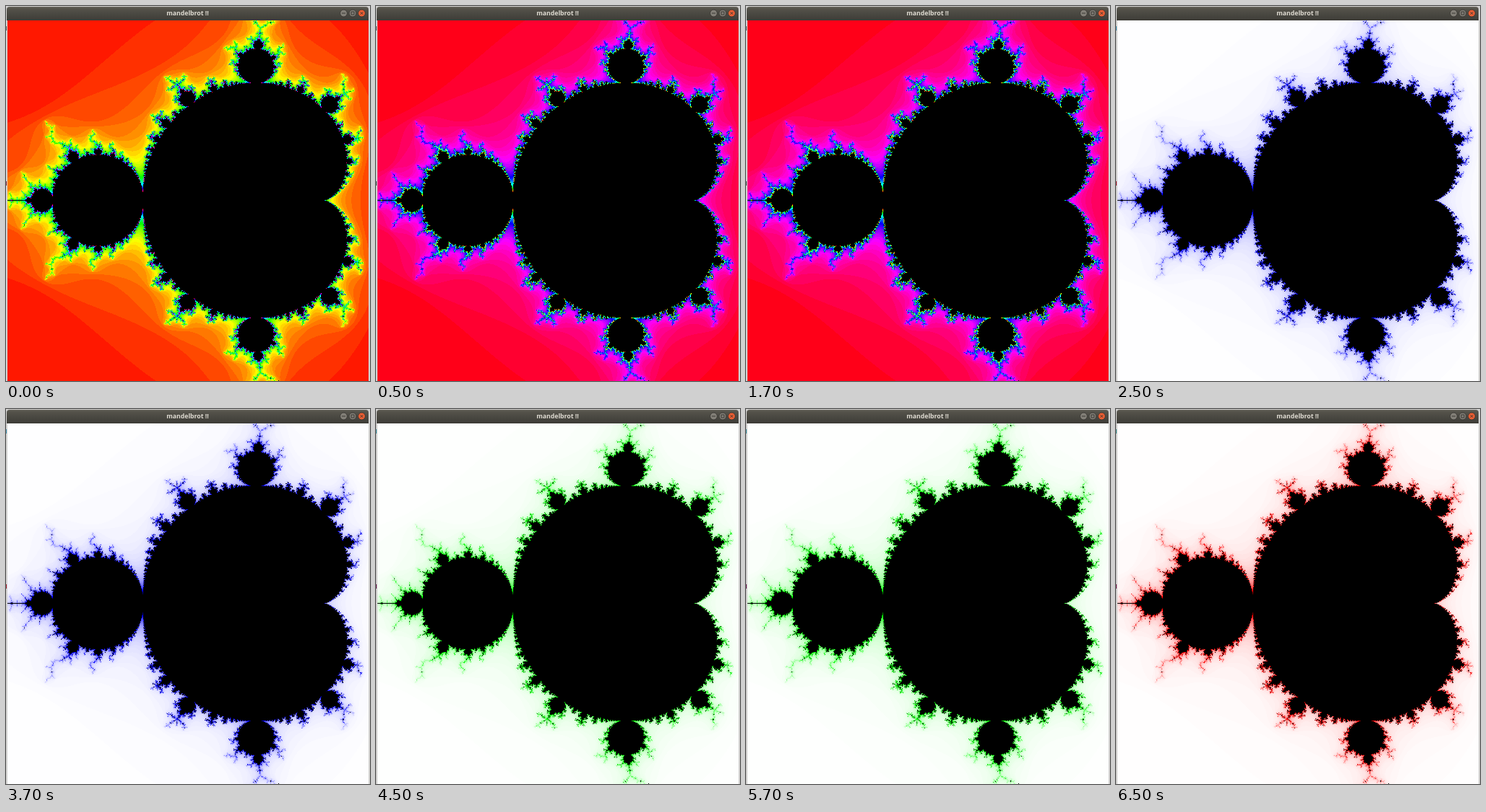
An HTML page with a canvas that plays this animation: 504x520 px, repeating every 8000 ms.

```html
<!DOCTYPE html>
<html lang="en">
<head>
<meta charset="utf-8">
<title>mandelbrot</title>
<style>
  html, body { margin: 0; width: 504px; height: 520px; overflow: hidden; background: #d2d1d0; }
  body { position: relative; }
  canvas { position: absolute; left: 2px; top: 20px; }
  .bar {
    position: absolute; left: 1px; top: 1px; width: 501px; height: 19px;
    border-radius: 4px 4px 0 0;
    background: linear-gradient(#6a6860, #55534b 12%, #3d3c37);
    color: #dfdbd2; text-align: center;
    font: bold 8.7px/18px "Open Sans", "Noto Sans", sans-serif;
  }
  svg { position: absolute; left: 0; top: 0; }
  .speck { position: absolute; left: 0; width: 1px; height: 6px; }
</style>
</head>
<body>
<div class="bar">mandelbrot !!</div>
<canvas id="view" width="500" height="500"></canvas>
<i class="speck" id="upper" style="top:28px"></i>
<i class="speck" id="lower" style="top:243px"></i>
<svg width="504" height="520" fill="none">
  <g stroke="#33322e" stroke-width=".8">
    <circle cx="467.5" cy="10" r="4.9" fill="#827f77"/>
    <circle cx="480" cy="10" r="4.9" fill="#827f77"/>
    <circle cx="492.5" cy="10" r="4.9" fill="#ec5e33"/>
  </g>
  <path d="M465 10h5M478 8h4v4h-4zM490.7 8.2l3.6 3.6m0-3.6l-3.6 3.6" stroke="#3a3934"/>
</svg>
<script>
const SIZE = 500, SCALE = 250, LIMIT = 64, LOOP = 8000;
const ctx = document.getElementById('view').getContext('2d');
const upper = document.getElementById('upper');
const lower = document.getElementById('lower');

function escapeTime(cx, cy) {
  let x = 0, y = 0;
  for (let n = 0; n < LIMIT + 2; n++) {
    const t = x * x - y * y + cx;
    y = 2 * x * y + cy;
    x = t;
    if (x * x + y * y > 4) return Math.max(0, n - 1);
  }
  return LIMIT;
}

function hsl(hue, light) {
  const a = Math.min(light, 1 - light);
  return [0, 8, 4].map(n => {
    const k = (n + hue / 30) % 12;
    return Math.round(255 * (light - a * Math.max(-1, Math.min(k - 3, 9 - k, 1))));
  });
}

// White far away, darkening quickly close to the set
const shade = hue => f => hsl(hue, 1 - f ** 1.5);
const modes = [
  { at: 0,    color: f => hsl(360 * f, .5),       upper: '#555', lower: '#8c1c24' },
  { at: 500,  color: f => hsl(360 * (1 - f), .5), upper: '#555', lower: '#444' },
  { at: 2500, color: shade(240),                  upper: '#3c8fb0', lower: '#a01c30' },
  { at: 4500, color: shade(120),                  upper: '#3c8fa0', lower: '#6a2050' },
  { at: 6500, color: shade(0),                    upper: '#3c8f90', lower: '#7a2050' }
];

const counts = new Uint8Array(SIZE * SIZE);
for (let i = 0; i < counts.length; i++) {
  const col = i % SIZE, row = Math.floor(i / SIZE);
  counts[i] = escapeTime(col / SCALE - 1.5, (row - 249) / SCALE);
}

function paint(mode) {
  const palette = Array.from({ length: LIMIT }, (_, n) => mode.color(n / LIMIT));
  palette.push([0, 0, 0]);
  const img = ctx.createImageData(SIZE, SIZE);
  counts.forEach((n, i) => img.data.set([...palette[n], 255], i * 4));
  return img;
}

const images = modes.map(paint);
const start = performance.now();
let shown = -1;

function frame() {
  const t = (performance.now() - start) % LOOP;
  const now = modes.filter(m => m.at <= t).length - 1;
  if (now !== shown) {
    shown = now;
    ctx.putImageData(images[now], 0, 0);
    upper.style.background = modes[now].upper;
    lower.style.background = modes[now].lower;
  }
  requestAnimationFrame(frame);
}
frame();
</script>
</body>
</html>
```
